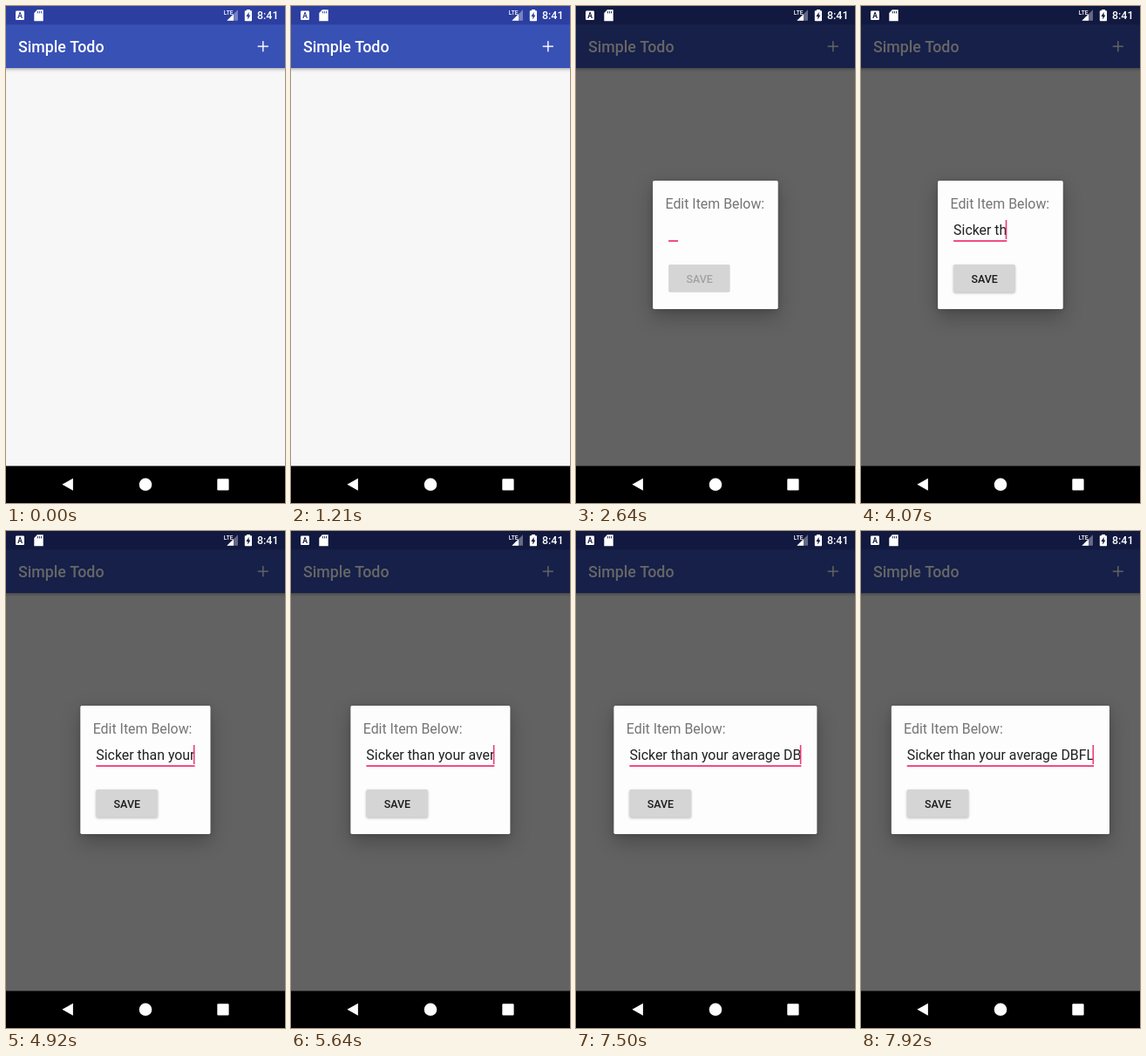
Recreate the animation shown at these times as an HTML page with a canvas. Size 320 by 569 pixels, loop 8000 ms.

```html
<!DOCTYPE html>
<html lang="en">
<head>
<meta charset="utf-8">
<title>Simple Todo</title>
<style>
  html, body { margin: 0; width: 100%; height: 100%; overflow: hidden; background: #000; }
  canvas { display: block; width: 320px; height: 569px; }
</style>
</head>
<body>
<canvas id="stage"></canvas>
<script>
const W = 320, H = 569, LOOP = 8000;
const TICK = 142.7, OFFSET = 62;  // the picture advances once per tick
const PRESS = 2, OPEN = 9;        // ticks at which the button is pressed and the dialog opens
const PINK = '#ee3a78';
const MESSAGE = 'Sicker than your average DBFL';

// Typing speed changes at these [tick, letters] points.
const PACE = [[20, 1], [22, 2], [34, 16], [39, 21], [45, 25], [48, 25], [55, 29]];

const canvas = document.getElementById('stage');
const ctx = canvas.getContext('2d');
const dpr = window.devicePixelRatio || 1;
canvas.width = Math.round(W * dpr);
canvas.height = Math.round(H * dpr);

const clamp = v => Math.min(1, Math.max(0, v));

function letters(n) {
  if (n < PACE[0][0]) return 0;
  for (let i = 1; i < PACE.length; i++) {
    const [n0, c0] = PACE[i - 1], [n1, c1] = PACE[i];
    if (n < n1) return Math.floor(c0 + (c1 - c0) * (n - n0) / (n1 - n0));
  }
  return MESSAGE.length;
}

// Blinks while empty, stays lit while typing, goes dark in a pause.
function caretOn(n) {
  const count = letters(n);
  return count ? count !== letters(n - 3) : Math.floor(n / 3) % 2 === 1;
}

function rect(x, y, w, h, color) {
  ctx.fillStyle = color;
  ctx.fillRect(x, y, w, h);
}

function rounded(x, y, w, h, r, color) {
  ctx.fillStyle = color;
  ctx.beginPath();
  ctx.roundRect(x, y, w, h, r);
  ctx.fill();
}

function poly(points, color) {
  ctx.fillStyle = color;
  ctx.beginPath();
  for (const [x, y] of points) ctx.lineTo(x, y);
  ctx.closePath();
  ctx.fill();
}

function disc(x, y, r, color) {
  ctx.fillStyle = color;
  ctx.beginPath();
  ctx.arc(x, y, r, 0, Math.PI * 2);
  ctx.fill();
}

function label(str, x, y, size, color, weight = 400, align = 'left') {
  ctx.font = `${weight} ${size}px Roboto, sans-serif`;
  ctx.textAlign = align;
  ctx.fillStyle = color;
  ctx.fillText(str, x, y);
  return ctx.measureText(str).width;
}

function withShadow(color, blur, dy, draw) {
  ctx.save();
  ctx.shadowColor = color;
  ctx.shadowBlur = blur * dpr;
  ctx.shadowOffsetY = dy * dpr;
  draw();
  ctx.restore();
}

function triangle(right, bottom, size, color) {
  poly([[right, bottom - size], [right, bottom], [right - size, bottom]], color);
}

function statusIcons(bar) {
  rounded(11, 5.5, 10, 10.5, 1.2, '#fff');
  label('A', 16, 14, 8.5, bar, 700, 'center');

  poly([[35.8, 4.3], [42.7, 4.3], [42.7, 17.2], [32.3, 17.2], [32.3, 8]], '#fff');
  for (let i = 0; i < 3; i++) rect(35.8 + i * 2.1, 6, 0.9, 2.4, bar);

  label('LTE', 249.8, 9.6, 6.6, '#fff', 500);
  triangle(266, 16.8, 12.5, 'rgba(255,255,255,0.35)');
  poly([[261, 9.2], [261, 16.8], [253.4, 16.8]], '#fff');

  rect(276, 4, 4, 2, '#fff');
  rounded(273.8, 5.2, 8.2, 12, 0.8, '#fff');
  poly([[278.6, 7], [275.4, 12], [277.4, 12], [277.2, 15.6], [280.4, 10.6], [278.6, 10.6]], bar);

  label('8:41', 288, 15.4, 12.44, '#fff', 500);
}

function navBar() {
  rect(0, 526.6, W, H, '#000');
  poly([[64.4, 547.8], [76.9, 540.8], [76.9, 554.8]], '#fff');
  disc(160, 547.8, 7.3, '#fff');
  rounded(242.3, 541.2, 13.3, 13.3, 1.2, '#fff');
}

function ripple(n) {
  const q = clamp((n - PRESS) / 6);
  const glow = 0.2 * Math.sin(Math.PI * q);
  disc(294.8, 46.2, 17 * clamp(0.2 + 2 * q), `rgba(255,255,255,${glow})`);
}

function page(n, dim) {
  rect(0, 0, W, H, '#f7f7f7');
  withShadow('rgba(0,0,0,0.38)', 4, 1, () => rect(-8, 0, W + 16, 71, '#3851b5'));
  rect(0, 0, W, 21.3, '#2c3ea0');
  ripple(n);

  label('Simple Todo', 14, 53, 17.78, '#fff', 500);
  ctx.globalAlpha = 0.85;
  rect(288.7, 45.4, 12.2, 1.7, '#fff');
  rect(293.95, 40.1, 1.7, 12.2, '#fff');
  ctx.globalAlpha = 1;

  rect(0, 0, W, H, `rgba(0,0,0,${dim})`);
  const shade = [44, 62, 160].map(c => Math.round(c * (1 - dim)));
  statusIcons(`rgb(${shade})`);
}

function saveButton(x, enabled) {
  const face = () => rounded(x, 296, 70.6, 31.8, 1.8, '#d5d5d5');
  if (enabled) withShadow('rgba(0,0,0,0.28)', 3, 1, face);
  else face();
  label('SAVE', x + 35.5, 316.5, 12.44, enabled ? '#1c1c1c' : '#a2a2a2', 500, 'center');
}

function dialog(n, p) {
  const str = MESSAGE.slice(0, letters(n));
  const size = 15.9;
  ctx.font = `${size}px Roboto, sans-serif`;
  const textW = ctx.measureText(str).width;
  const w = Math.max(143.2, textW + 35.6);
  const left = (W - w) / 2 - 0.1;
  const fieldX = left + 17.8;
  const scale = 0.94 + 0.06 * clamp(1.5 * p);

  ctx.save();
  ctx.globalAlpha = clamp(1.5 * p);
  ctx.translate(160, 273.5);
  ctx.scale(scale, scale);
  ctx.translate(-160, -273.5);

  const sheet = () => rounded(left, 200, w, 147, 1.8, '#fdfdfd');
  withShadow('rgba(0,0,0,0.25)', 22, 9, sheet);
  withShadow('rgba(0,0,0,0.12)', 6, 1, sheet);

  label('Edit Item Below:', left + 14.2, 231.5, size, '#757575');
  label(str, fieldX, 262.4, size, '#212121');
  rect(fieldX, 268.1, Math.max(11, textW), 1.8, PINK);
  if (caretOn(n)) rect(fieldX + Math.max(0, textW - 1.6), 245, 1.6, 22, PINK);
  saveButton(fieldX, str.length > 0);
  ctx.restore();
}

function render(t) {
  ctx.setTransform(dpr, 0, 0, dpr, 0, 0);
  const n = Math.floor((t - OFFSET) / TICK);
  const p = clamp((n - OPEN) / 3);
  page(n, 0.6 * p ** 0.73);
  if (p > 0) dialog(n, p);
  navBar();
}

const start = performance.now();
function tick() {
  render((performance.now() - start) % LOOP);
  requestAnimationFrame(tick);
}
tick();
</script>
</body>
</html>
```
